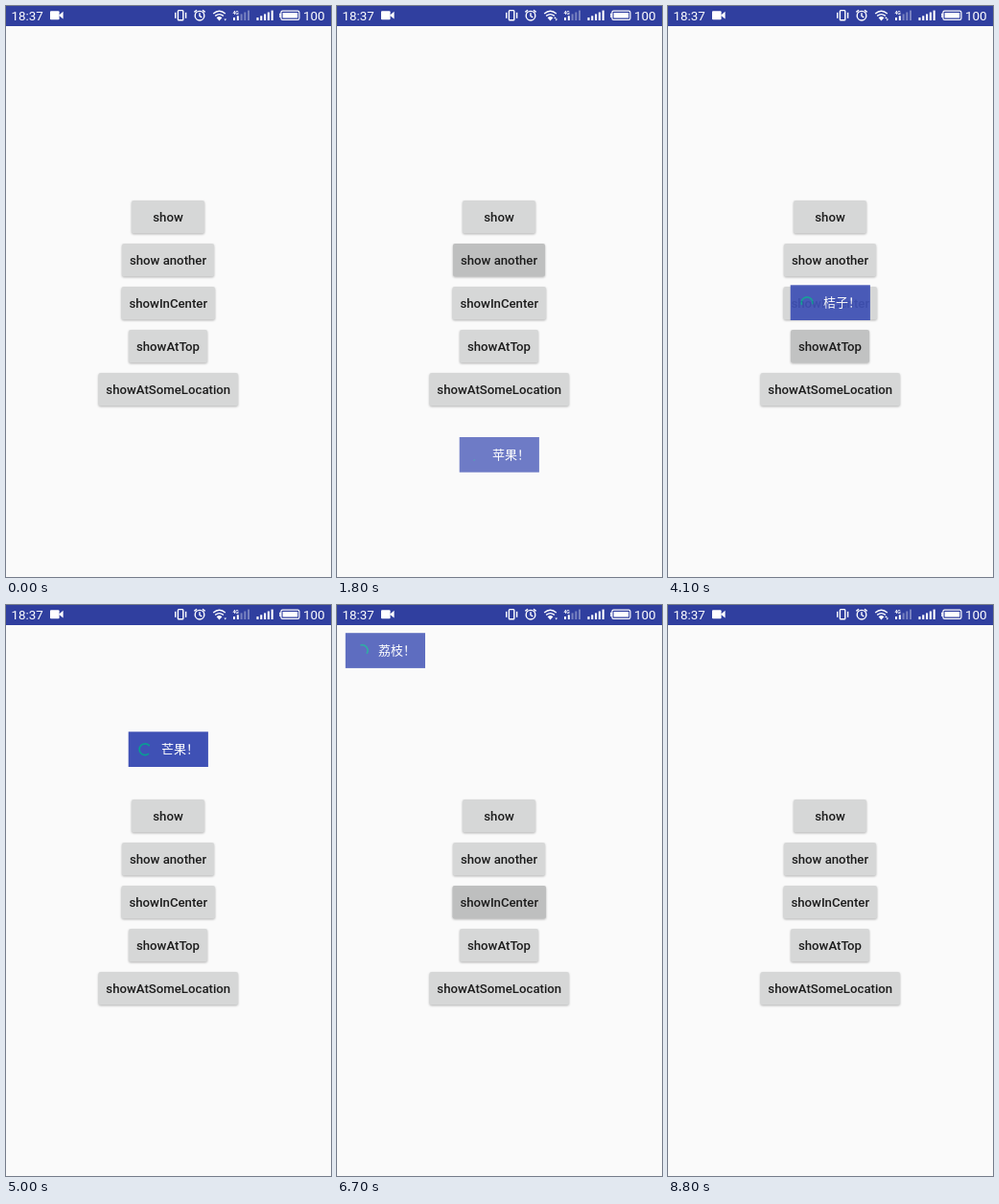
Animation, 339 px wide and 596 px high, one loop 9.2 s. Source, as an HTML page:

```html
<!DOCTYPE html>
<html lang="zh-CN">
<head>
<meta charset="utf-8">
<title>Toast demo</title>
<style>
  html, body { margin: 0; width: 100%; height: 100%; overflow: hidden; background: #fafafa; }
  svg { display: block; }
  text { font-family: Roboto, "Noto Sans CJK SC", "Noto Sans CJK", sans-serif; }
  .status { font-size: 13.4px; fill: #fff; }
  .button rect { fill: #d6d7d7; }
  .button .face { filter: drop-shadow(0 1px 1px rgba(0, 0, 0, .28)); }
  .button .press { fill: #000; }
  .button text { font-size: 13.2px; font-weight: 500; fill: #1c1c1c; text-anchor: middle; }
  .toast rect { fill: #3f51b5; }
  .toast text { font-family: "Noto Sans CJK SC", "Noto Sans CJK", sans-serif; font-size: 13px; fill: #fff; }
  .toast path { fill: none; stroke: #0a9c94; stroke-width: 1.7; }
</style>
</head>
<body>
<svg id="stage" width="339" height="596" viewBox="0 0 339 596">
  <rect width="339" height="596" fill="#fafafa"/>
  <rect width="339" height="21" fill="#303f9f"/>
  <text class="status" x="5.5" y="14.6">18:37</text>
  <text class="status" x="310" y="14.6">100</text>

  <g fill="#fff">
    <!-- camera -->
    <rect x="46" y="5.2" width="9.6" height="9" rx="1"/>
    <path d="M55 9.7L59.6 5.8V13.6Z"/>
    <!-- wifi -->
    <path d="M222.5 15.6L219.6 12.2Q222.5 10 225.4 12.2Z"/>
    <!-- weak signal -->
    <rect x="237" y="12" width="2" height="3"/>
    <rect x="240.8" y="10.3" width="2" height="4.7"/>
    <g opacity=".35">
      <rect x="244.6" y="8.4" width="2" height="6.6"/>
      <rect x="248.3" y="6.5" width="2" height="8.5"/>
      <rect x="252" y="4.6" width="2" height="10.4"/>
    </g>
    <text x="236.4" y="8.6" font-size="5.2" font-weight="700">4G</text>
    <!-- full signal -->
    <rect x="261.4" y="12" width="2.1" height="3"/>
    <rect x="265.2" y="10.3" width="2.1" height="4.7"/>
    <rect x="269" y="8.4" width="2.1" height="6.6"/>
    <rect x="272.8" y="6.5" width="2.1" height="8.5"/>
    <rect x="276.6" y="4.6" width="2.1" height="10.4"/>
    <!-- battery -->
    <rect x="288.6" y="7" width="15.6" height="5.6" rx=".6"/>
    <rect x="285.2" y="7.6" width="1.5" height="4.4" rx=".6"/>
    <!-- vibrate -->
    <rect x="176" y="6.8" width="1.4" height="6"/>
    <rect x="186.9" y="6.8" width="1.4" height="6"/>
  </g>
  <g fill="none" stroke="#fff" stroke-width="1.4">
    <rect x="179.4" y="4.6" width="5.4" height="10.2" rx=".8"/>
    <circle cx="202" cy="10.2" r="4.8"/>
    <path d="M202 7.2V10.4L204.3 11.8M196.4 6.4L199 4.2M207.6 6.4L205 4.2"/>
    <path d="M216.2 8Q222.5 2.6 228.8 8M218.2 10.4Q222.5 6.8 226.8 10.4"/>
    <rect x="286.9" y="5.2" width="19" height="9.2" rx="1.6" stroke-width="1.2"/>
  </g>
  <g id="traffic" fill="#fff">
    <path d="M226.2 13L227.5 11.2L228.8 13Z"/>
    <path d="M227.4 13.6H230L228.7 15.6Z"/>
  </g>
</svg>

<script>
const LOOP = 9200;
const CYCLE = 1333;
const stage = document.getElementById('stage');
const traffic = document.getElementById('traffic').children;

// label, left, top, width, press times
const buttons = [
  ['show', 131, 203, 76, [480]],
  ['show another', 121, 248, 96, [1600]],
  ['showInCenter', 120.5, 293, 97.5, [2750, 6500]],
  ['showAtTop', 128, 338, 82, [4000]],
  ['showAtSomeLocation', 96.5, 383, 145.5, [5250]]
];

// label, left, top, fade-in start, fade-out start
const toasts = [
  ['苹果！', 127.7, 450, 550, 1725],
  ['香蕉！', 127.7, 450, 2080, 2875],
  ['桔子！', 127.7, 291.3, 3275, 4080],
  ['芒果！', 127.7, 132.3, 4400, 5400],
  ['荔枝！', 8.8, 29.2, 5800, 6650],
  ['桔子！', 127.7, 291.3, 6950, 8450]
];

function add(parent, tag, attrs, text) {
  const el = document.createElementNS('http://www.w3.org/2000/svg', tag);
  for (const key in attrs) el.setAttribute(key, attrs[key]);
  if (text) el.textContent = text;
  return parent.appendChild(el);
}

const clamp = v => Math.max(0, Math.min(1, v));

// Cubic bezier (.4, 0, .2, 1)
function fastOutSlowIn(x) {
  let lo = 0, hi = 1;
  for (let i = 0; i < 18; i++) {
    const u = (lo + hi) / 2, v = 1 - u;
    if (1.2 * v * v * u + .6 * v * u * u + u ** 3 < x) lo = u; else hi = u;
  }
  return lo * lo * (3 - 2 * lo);
}

const presses = buttons.map(([label, x, y, width, times]) => {
  const g = add(stage, 'g', { class: 'button' });
  const box = { x, y, width, height: 34.3, rx: 2 };
  add(g, 'rect', { ...box, class: 'face' });
  const overlay = add(g, 'rect', { ...box, class: 'press', opacity: 0 });
  add(g, 'text', { x: x + width / 2, y: y + 21.7 }, label);
  return { overlay, times };
});

const popups = toasts.map(([label, x, y, start, end]) => {
  const g = add(stage, 'g', { class: 'toast', transform: `translate(${x} ${y})` });
  add(g, 'rect', { width: 83.2, height: 36.7 });
  const arc = add(g, 'path');
  add(g, 'text', { x: 34.2, y: 23.2 }, label);
  return { g, arc, start, end };
});

function spinnerPath(t) {
  const p = (t % CYCLE) / CYCLE;
  const turn = t * 720 / 4444 + 90 * p + 360 * .75 * Math.floor(t / CYCLE) - 90;
  const from = turn + 270 * fastOutSlowIn(clamp(p * 2 - 1));
  const to = turn + 270 * fastOutSlowIn(clamp(p * 2)) + 6;
  const point = deg => {
    const a = deg * Math.PI / 180;
    return `${(17.3 + 5.9 * Math.cos(a)).toFixed(2)} ${(18.4 + 5.9 * Math.sin(a)).toFixed(2)}`;
  };
  return `M${point(from)}A5.9 5.9 0 ${to - from > 180 ? 1 : 0} 1 ${point(to)}`;
}

function pressLevel(t) {
  if (t < 0) return 0;
  return .115 * Math.min(clamp(t / 120), clamp((460 - t) / 200));
}

function draw(time) {
  const t = time % LOOP;
  for (const { overlay, times } of presses) {
    overlay.setAttribute('opacity', Math.max(...times.map(s => pressLevel(t - s))));
  }
  for (const { g, arc, start, end } of popups) {
    const shown = 1 - (1 - clamp((t - start) / 300)) ** 2;
    const alpha = shown * (1 - clamp((t - end) / 300));
    g.setAttribute('opacity', alpha);
    if (alpha > 0) arc.setAttribute('d', spinnerPath(t - start));
  }
  const beat = Math.floor((t + 100) / 400);
  traffic[0].setAttribute('opacity', beat % 3 === 1 ? 1 : 0);
  traffic[1].setAttribute('opacity', beat % 4 === 3 ? 0 : 1);
}

const origin = performance.now();
function tick() {
  draw(performance.now() - origin);
  requestAnimationFrame(tick);
}
tick();
</script>
</body>
</html>
```
